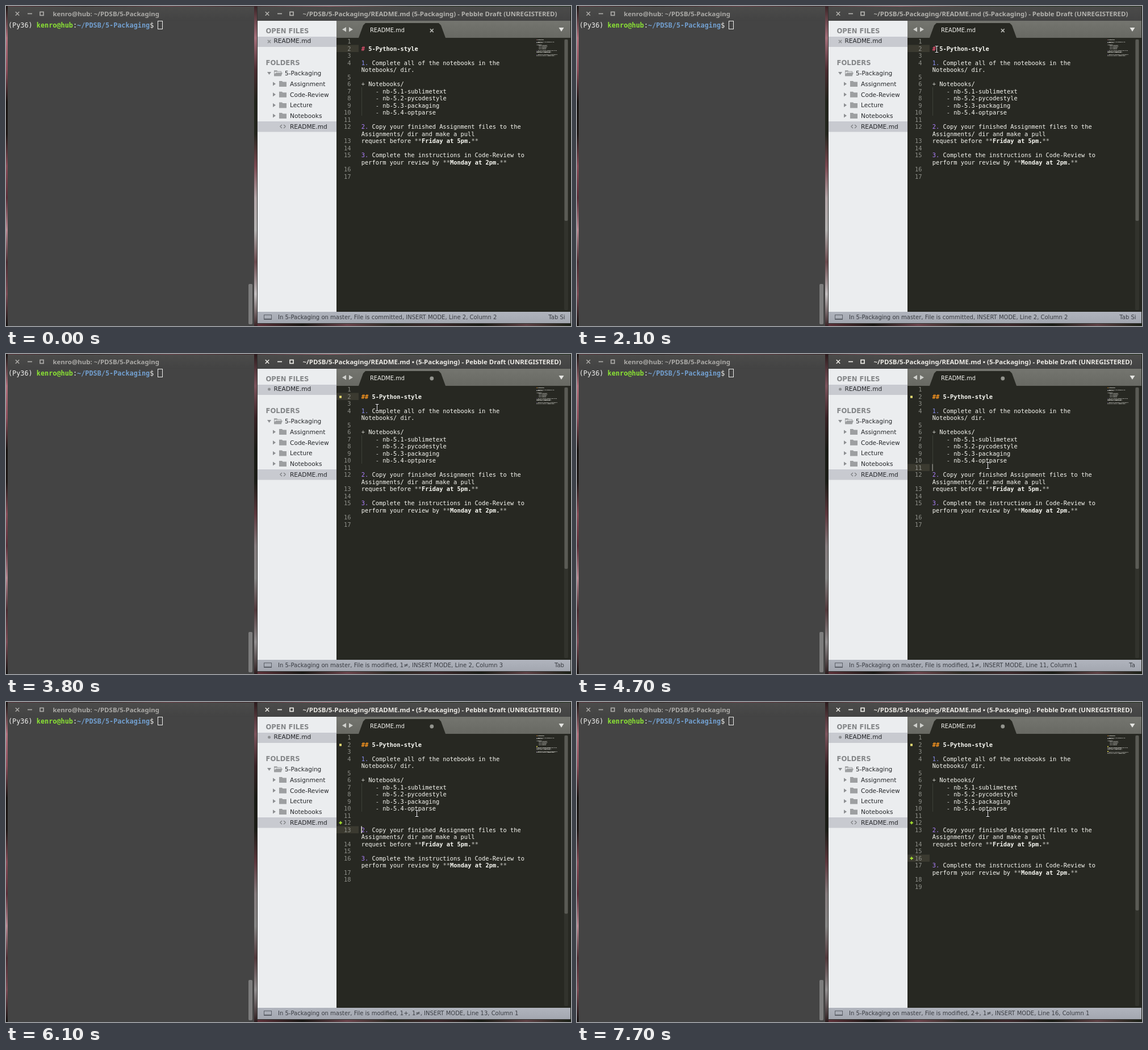
These frames come from a looping animation (995 by 563 pixels, 8 s). An HTML page with a canvas:

```html
<!DOCTYPE html>
<html lang="en">
<head>
<meta charset="utf-8">
<title>Editing a README</title>
<style>
  html, body { margin: 0; width: 100%; height: 100%; overflow: hidden; background: #222; }
  canvas { display: block; }
</style>
</head>
<body>
<canvas id="stage" width="995" height="563"></canvas>
<script>
const ctx = document.getElementById('stage').getContext('2d');
const LOOP = 8000, STEP = 100;
const CHAR = 6.25, ROW = 12.5, TEXT_X = 625.7, TOP_Y = 56;
const MAP_X = 934, MAP_Y = 57, MAP_SCALE = .128, MAP_ROW = 1.72;

const UI = '"DejaVu Sans", sans-serif';
const MONO = '"DejaVu Sans Mono", monospace';
const TITLE_FONT = 'bold 11.45px "Noto Sans", sans-serif';
const CODE = `10.38px ${MONO}`;

const DOCUMENT = [
  '', '# 5-Python-style', '',
  '1. Complete all of the notebooks in the\nNotebooks/ dir.', '',
  '+ Notebooks/',
  '    - nb-5.1-sublimetext', '    - nb-5.2-pycodestyle',
  '    - nb-5.3-packaging', '    - nb-5.4-optparse', '',
  '2. Copy your finished Assignment files to the\nAssignments/ dir and make a pull',
  'request before **Friday at 5pm.**', '',
  '3. Complete the instructions in Code-Review to\nperform your review by **Monday at 2pm.**',
  '', ''
];

const FOCUS = 2400, TYPE_HASH = 3000, MARK_HASH = 3300;
const INSERTS = [
  { at: 5200, markAt: 5600, index: 11 },
  { at: 6900, markAt: 7400, index: 15 }
];

// time, visual row, visual column, line, column
const CARET = [
  [FOCUS, 1, 1, 2, 2], [TYPE_HASH, 1, 2, 2, 3], [4200, 11, 0, 11, 1],
  [5200, 12, 0, 12, 1], [6100, 13, 0, 13, 1], [6300, 14, 0, 13, 47],
  [6400, 15, 0, 14, 1], [6600, 16, 0, 15, 1], [6900, 17, 0, 16, 1]
];

// time, x, y
const POINTER = [
  [400, 193, 36], [500, 228, 78], [600, 258, 127], [800, 258, 127],
  [900, 345, 132], [1000, 577, 118], [1100, 446, 118], [1300, 446, 118],
  [1500, 475, 117], [1800, 590, 96], [2100, 633, 76], [2600, 633, 76],
  [2900, 645, 87], [3000, 649, 90], [3300, 653, 94], [3800, 653, 94],
  [4100, 723, 196]
];

const clamp = v => Math.max(0, Math.min(1, v));

function rect(x, y, w, h, color) {
  ctx.fillStyle = color;
  ctx.fillRect(x, y, w, h);
}

function poly(color, ...points) {
  ctx.fillStyle = color;
  ctx.beginPath();
  points.forEach(([x, y]) => ctx.lineTo(x, y));
  ctx.closePath();
  ctx.fill();
}

function lines(color, width, ...segments) {
  ctx.strokeStyle = color;
  ctx.lineWidth = width;
  ctx.beginPath();
  for (const [x1, y1, x2, y2] of segments) {
    ctx.moveTo(x1, y1);
    ctx.lineTo(x2, y2);
  }
  ctx.stroke();
}

function cross(x, y, r, color, width) {
  lines(color, width, [x - r, y - r, x + r, y + r], [x - r, y + r, x + r, y - r]);
}

function dot(x, y, r, color) {
  ctx.fillStyle = color;
  ctx.beginPath();
  ctx.arc(x, y, r, 0, 7);
  ctx.fill();
}

function pill(x, y, w, h, color) {
  ctx.fillStyle = color;
  ctx.beginPath();
  ctx.roundRect(x, y, w, h, 2);
  ctx.fill();
}

function label(text, x, y, font, color, align = 'left') {
  ctx.font = font;
  ctx.fillStyle = color;
  ctx.textAlign = align;
  ctx.fillText(text, x, y);
}

function gradient(x1, y1, x2, y2, colors) {
  const g = ctx.createLinearGradient(x1, y1, x2, y2);
  colors.forEach((c, i) => g.addColorStop(i / (colors.length - 1), c));
  return g;
}

// blurred blossoms showing around the windows
function desktop(focused) {
  rect(0, 0, 995, 563, '#1d2018');
  rect(0, 0, 995, 1, gradient(0, 0, 995, 0,
    ['#5a3038', '#2a1c1b', '#6b3a42', '#3a2224', '#a25c69', '#2b2f22', '#1f2a1a', '#23301d']));
  rect(0, 0, 3, 563, gradient(0, 0, 0, 563,
    ['#17110f', '#b5727f', '#8e4d5a', '#15100e', '#1c1513', '#8a4c58', '#5a2c36', '#b98a94', '#4a2a30', '#7d4a54', '#120f0d']));
  rect(437, 0, 6, 563, gradient(0, 0, 0, 563,
    ['#3a2326', '#a5707b', '#4a2b30', '#20231a', '#23251d', '#7a4850', '#b3a6a8', '#b4b3b2', '#6b4a4e', '#c4c0c1', '#3b2427']));
  rect(443, 558, 552, 5, gradient(443, 0, 995, 0,
    ['#5d3139', '#191714', '#6a434b', '#2b2a22', '#3f292d', '#1a1c16', '#5d4044', '#1a2016']));
  if (focused) rect(437, 0, 6, 563, 'rgba(0,0,0,.25)');
}

function titleBar(x, w, title, color) {
  rect(x, 1, w, 25, gradient(0, 1, 0, 26, ['#4b4b4a', '#434343']));
  cross(x + 17, 13.5, 3.2, color, 1.6);
  lines(color, 1.7, [x + 35, 13.5, x + 43, 13.5]);
  ctx.strokeRect(x + 57, 10.5, 6, 6);
  label(title, x + 79.5, 17.8, TITLE_FONT, color);
}

function terminal() {
  rect(3, 1, 434, 562, '#444444');
  titleBar(3, 434, 'kenro@hub: ~/PDSB/5-Packaging', '#aaa9a6');
  const prompt = [
    ['(Py36) ', '#eeeeec'], ['kenro@hub', '#8ae234', 'bold '], [':', '#eeeeec'],
    ['~/PDSB/5-Packaging', '#729fcf', 'bold '], ['$', '#eeeeec']
  ];
  let x = 4;
  for (const [text, color, weight = ''] of prompt) {
    label(text, x, 38, `${weight}11.83px ${MONO}`, color);
    x += text.length * 7.12;
  }
  ctx.strokeStyle = '#eeeeec';
  ctx.lineWidth = 1;
  ctx.strokeRect(267.5, 26.5, 8, 14);
  pill(427, 489, 7, 71, '#7c7c7c');
}

function folder(x, y, open) {
  const gray = '#9d9fa1';
  poly(gray, [x, y - 5], [x + 5, y - 5], [x + 6.5, y - 3.5], [x + 13, y - 3.5], [x + 13, y + 5], [x, y + 5]);
  if (open) {
    rect(x + 1, y - 2.5, 11, 3, '#ebedef');
    poly(gray, [x + 3, y - 1], [x + 15, y - 1], [x + 12.5, y + 5], [x, y + 5]);
  }
}

function sidebar(edited) {
  rect(443, 26, 139, 512, '#ebedef');
  rect(443, 54, 139, 18, '#c8cad0');
  rect(443, 203, 139, 18.5, '#c8cad0');
  const heading = `bold 11.6px ${UI}`, item = `10.6px ${UI}`, ink = '#25272a', gray = '#8d8f92';
  label('OPEN FILES', 457.5, 48.3, heading, '#858789');
  label('FOLDERS', 457.5, 104.3, heading, '#858789');
  if (edited) dot(463.5, 62, 2.5, gray);
  else cross(463.5, 62.5, 2.6, gray, 1.5);
  label('README.md', 471.5, 65.3, item, ink);

  poly(gray, [460, 116], [467, 116], [463.5, 121]);
  folder(472, 118.3, true);
  label('5-Packaging', 491, 122, item, ink);
  ['Assignment', 'Code-Review', 'Lecture', 'Notebooks'].forEach((name, i) => {
    const y = 137 + i * 18.7;
    poly(gray, [470, y - 3.5], [475, y], [470, y + 3.5]);
    folder(481, y, false);
    label(name, 500, y + 3.8, item, ink);
  });
  lines('#77797c', 1.1, [486, 209, 482.5, 212], [482.5, 212, 486, 215], [489, 209, 492.5, 212], [492.5, 212, 489, 215]);
  label('README.md', 500, 215.6, item, ink);
}

function tabBar(edited) {
  rect(582, 26, 412, 30, gradient(0, 26, 0, 56, ['#74756f', '#686963']));
  poly('#272822', [621, 56], [629, 34], [633, 30], [762, 30], [766, 34], [774, 56]);
  const light = '#cfd0cc';
  poly(light, [599, 37], [599, 45.5], [592, 41.2]);
  poly(light, [604, 37], [604, 45.5], [611, 41.2]);
  poly('#e4e4e1', [973.5, 38], [982.5, 38], [978, 45]);
  label('README.md', 641, 45.8, `9.85px ${UI}`, '#f2f2ee');
  if (edited) dot(749.8, 43, 3.4, '#93948e');
  else cross(749.8, 43.2, 2.9, '#b9bab5', 1.6);
}

function colorSpans(text) {
  if (text[0] === '#') {
    const hashes = text.match(/^#+/)[0];
    return [
      [hashes, hashes.length > 1 ? '#fd971f' : '#e0506e', true],
      [text.slice(hashes.length), '#f8f8f2', true]
    ];
  }
  let bold = false;
  return text.split(/(^\d\.|^ *[-+] |\*\*)/).map(part => {
    if (part === '**') {
      bold = !bold;
      return [part, '#c9c9c4', false];
    }
    if (/^\d\.$/.test(part)) return [part, part === '1.' ? '#8d92f5' : '#ae81ff', false];
    return [part, /^ *[-+] $/.test(part) ? '#c9c9c4' : '#f8f8f2', bold];
  });
}

function drawRows(rows, x, y, rowHeight) {
  rows.forEach((row, r) => {
    let column = 0;
    for (const [text, color, bold] of colorSpans(row.text)) {
      label(text, x + column * CHAR, y + r * rowHeight, (bold ? 'bold ' : '') + CODE, color);
      column += text.length;
    }
  });
}

function buildRows(t) {
  const doc = [...DOCUMENT], marks = {};
  if (t >= TYPE_HASH) doc[1] = '#' + doc[1];
  if (t >= MARK_HASH) marks[2] = 'changed';
  for (const { at, markAt, index } of INSERTS) {
    if (t >= at) doc.splice(index, 0, '');
    if (t >= markAt) marks[index + 1] = 'added';
  }
  return doc.flatMap((line, i) => line.split('\n').map((text, part) =>
    part ? { text } : { text, number: i + 1, mark: marks[i + 1] }));
}

function caretAlpha(age) {
  age %= 1250;
  return age < 1000 ? clamp((620 - age) / 220) : clamp((age - 1000) / 250);
}

function minimap(rows) {
  ctx.save();
  ctx.translate(MAP_X, MAP_Y);
  ctx.scale(MAP_SCALE, MAP_SCALE);
  for (let pass = 0; pass < 2; pass++) drawRows(rows, 0, 11, MAP_ROW / MAP_SCALE);
  ctx.restore();
  rows.forEach(({ mark }, r) => {
    if (mark === 'added') rect(MAP_X, MAP_Y + r * MAP_ROW, 2, MAP_ROW, '#d2cf45');
  });
}

function editor(t, caret) {
  const rows = buildRows(t);
  rect(582, 56, 412, 482, '#272822');
  rect(582, TOP_Y + caret[1] * ROW, 39, ROW, '#3b3a30');

  rows.forEach(({ number, mark }, r) => {
    const y = TOP_Y + r * ROW;
    if (number) label(number, 607.5, y + 10, CODE, '#8f908a', 'right');
    if (mark === 'changed') rect(587, y + 5, 4, 4, '#e6db74');
    if (mark === 'added') lines('#a6e22e', 1.8, [586.5, y + 6.5, 592, y + 6.5], [589.2, y + 3.8, 589.2, y + 9.2]);
  });
  ctx.setLineDash([1, 1]);
  lines('#55564f', 1, [626.5, TOP_Y + 7 * ROW, 626.5, TOP_Y + 11 * ROW]);
  ctx.setLineDash([]);
  drawRows(rows, TEXT_X, TOP_Y + 10, ROW);

  if (t >= FOCUS) {
    ctx.globalAlpha = caretAlpha(t - caret[0]);
    rect(625.5 + caret[2] * CHAR, TOP_Y + caret[1] * ROW, 1.3, ROW, '#f8f8f0');
    ctx.globalAlpha = 1;
  }

  minimap(rows);
  const added = INSERTS.reduce((sum, { at }) => sum + clamp((t - at + STEP) / 300), 0);
  pill(983, 58, 7, 477, '#32332d');
  pill(983.5, 59, 6, 319 - 5.6 * added, '#5a5b55');
}

function statusBar(t, caret) {
  rect(443, 538, 551, 20, gradient(0, 538, 0, 558, ['#b0b4bd', '#a3a7b0']));
  ctx.strokeStyle = '#5c6068';
  ctx.lineWidth = 1;
  ctx.strokeRect(454.5, 543.5, 13, 8);
  rect(455, 550, 12, 2, '#5c6068');
  const plus = INSERTS.filter(({ markAt }) => t >= markAt).length;
  const file = t < MARK_HASH ? 'committed' : `modified, ${plus ? plus + '+, ' : ''}1≠`;
  const text = `In 5-Packaging on master, File is ${file}, INSERT MODE, Line ${caret[3]}, Column ${caret[4]}`;
  label(text, 479, 550.8, `10px ${UI}`, '#393c42');

  // only whole characters that fit are shown
  const tabX = 479 + ctx.measureText(text).width + 91;
  let tab = 'Tab Size: 4';
  while (tab && tabX + ctx.measureText(tab).width > 989) tab = tab.slice(0, -1);
  ctx.fillText(tab, tabX, 550.8);
}

function pointer(t) {
  if (t < POINTER[0][0]) return;
  const next = POINTER.findIndex(p => p[0] > t);
  const b = POINTER[next < 0 ? POINTER.length - 1 : next];
  const a = next < 0 ? b : POINTER[next - 1];
  const k = a === b ? 0 : (t - a[0]) / (b[0] - a[0]);
  const x = a[1] + (b[1] - a[1]) * k, y = a[2] + (b[2] - a[2]) * k;
  if (x > 437 && x < 582) {
    const shape = [[0, 0], [0, 13], [3, 10.3], [5, 15], [7, 14], [5, 9.6], [9, 9.4]].map(([dx, dy]) => [x + dx, y + dy]);
    poly('#111', ...shape);
    ctx.strokeStyle = '#fff';
    ctx.lineWidth = 1;
    ctx.stroke();
    return;
  }
  const cx = Math.round(x) + .5;
  const beam = [
    [cx, y - 5, cx, y + 5], [cx - 2.8, y - 5.5, cx + 2.8, y - 5.5], [cx - 2.8, y + 5.5, cx + 2.8, y + 5.5]
  ];
  lines('#111', 2.6, ...beam);
  lines('#f4f4f4', 1.1, ...beam);
}

function draw(t) {
  const focused = t >= FOCUS, edited = t >= TYPE_HASH;
  const caret = CARET.filter(c => c[0] <= t).pop() || CARET[0];
  desktop(focused);
  terminal();
  rect(442, 1, 552, 558, '#30312f');
  titleBar(443, 551, `~/PDSB/5-Packaging/README.md ${edited ? '• ' : ''}(5-Packaging) - Pebble Draft (UNREGISTERED)`,
    focused ? '#eceae5' : '#b3b2ae');
  sidebar(edited);
  tabBar(edited);
  editor(t, caret);
  statusBar(t, caret);
  pointer(t);
}

const start = performance.now();
function frame() {
  const t = (performance.now() - start) % LOOP;
  draw(Math.floor(t / STEP) * STEP);
  requestAnimationFrame(frame);
}
frame();
</script>
</body>
</html>
```
